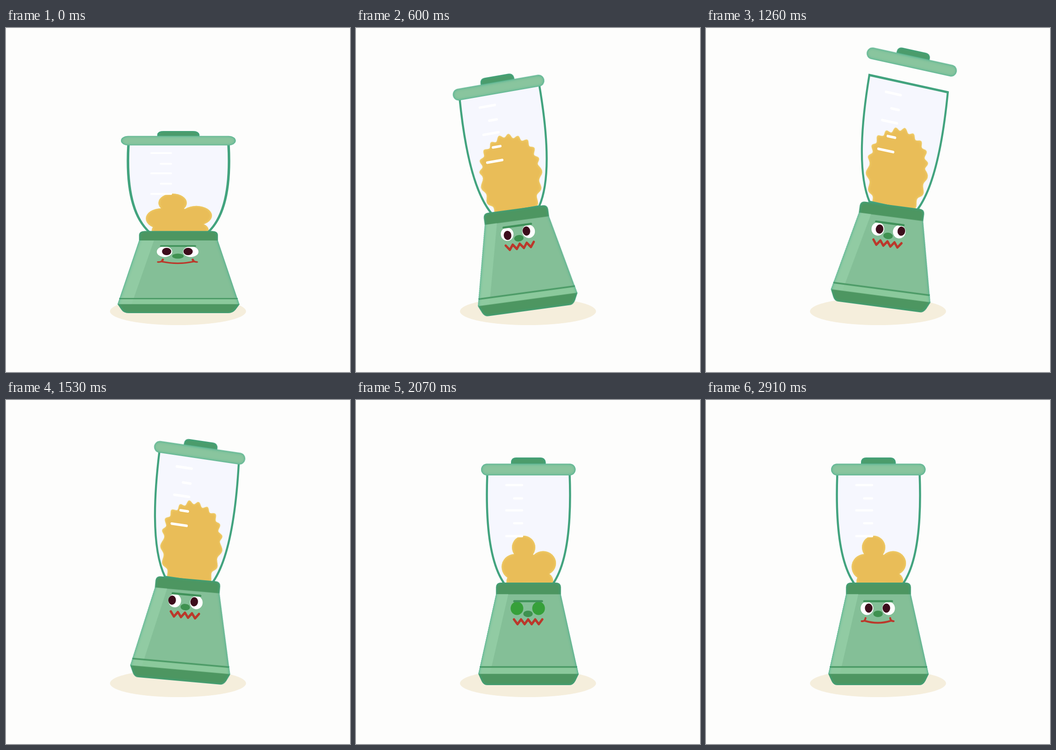
An HTML page for the animation above (2.94 s loop, 748x748 px).

```html
<!DOCTYPE html>
<html lang="en">
<head>
<meta charset="utf-8">
<title>Shaking blender</title>
<style>
  html, body { margin: 0; width: 100%; height: 100%; overflow: hidden; background: #fdfdfc; }
  svg { display: block; width: 100vw; height: 100vh; }
</style>
</head>
<body>
<svg viewBox="0 0 748 748">
  <defs>
    <filter id="teal" x="-20%" y="-40%" width="140%" height="180%" color-interpolation-filters="sRGB">
      <feFlood flood-color="#35a98c"/>
      <feComposite in2="SourceAlpha" operator="out"/>
      <feGaussianBlur stdDeviation="3"/>
      <feComposite in2="SourceAlpha" operator="in" result="rim"/>
      <feMerge><feMergeNode in="SourceGraphic"/><feMergeNode in="rim"/></feMerge>
    </filter>
    <filter id="gold" x="-20%" y="-20%" width="140%" height="140%" color-interpolation-filters="sRGB">
      <feFlood flood-color="#f5d873"/>
      <feComposite in2="SourceAlpha" operator="out"/>
      <feGaussianBlur stdDeviation="3"/>
      <feComposite in2="SourceAlpha" operator="in" result="rim"/>
      <feMerge><feMergeNode in="SourceGraphic"/><feMergeNode in="rim"/></feMerge>
    </filter>
    <path id="glass" d="M285.500 160C282 250 287 350 323 400H428C463 350 468 250 464.500 160Z"/>
    <clipPath id="inside"><use href="#glass"/></clipPath>
  </defs>

  <ellipse cx="374" cy="616" rx="148" ry="30" fill="#f5eedc"/>

  <g id="blender">
    <g id="jar">
      <use href="#glass" fill="#f6f7fe"/>
      <g clip-path="url(#inside)">
        <g id="lumps" fill="#e9bd58" filter="url(#gold)">
          <path d="M344 335L364 321L388 338L407 355L420 400H330Z"/>
          <circle cx="364.500" cy="320.500" r="25.500"/>
          <circle cx="344.500" cy="363" r="28"/>
          <ellipse cx="407" cy="355" rx="28" ry="26.500"/>
          <circle cx="346" cy="395" r="19"/>
          <circle cx="410" cy="394" r="19"/>
        </g>
        <path id="ball" fill="#e9bd58" filter="url(#gold)"/>
      </g>
      <path d="M327 185H361M344 214H361M327 240H361M344 268H361M327 296H361"
            stroke="#fff" stroke-width="5" stroke-linecap="round"/>
      <use href="#glass" fill="none" stroke="#42a37e" stroke-width="4.500"/>
    </g>

    <g id="lid">
      <path d="M337 141V135Q338 125 348 125H401Q411 125 412.500 135V141Z" fill="#4c9c6b" filter="url(#teal)"/>
      <rect x="272" y="138.500" width="205.500" height="25.500" rx="12.700" fill="#89c59e" filter="url(#teal)" id="rim"/>
    </g>

    <g filter="url(#teal)">
      <path d="M304.500 423V407Q305 397 315 397H435Q445 397 445.500 407V423Z" fill="#4d9661"/>
      <path d="M304.500 422.500H445.500L484 596H266Z" fill="#84bf97"/>
      <path d="M304.500 422.500H331L291 596H266Z" fill="#91cca3"/>
      <path d="M269.500 582H481L484 596H266Z" fill="#8bc99c"/>
      <path d="M304.500 422.500H331L291 596H266Z" fill="#91cca3" opacity=".6"/>
      <path d="M269 580.500H481" stroke="#4b9a66" stroke-width="3.500"/>
      <path d="M266 595.500H484.500L477 611Q472 620 464 620H286Q277 620 273 611Z" fill="#4d9661"/>
    </g>

    <g id="face" fill="none" stroke-linecap="round" stroke-linejoin="round">
      <g id="eyes">
        <ellipse cx="350" cy="453" rx="13.800" ry="14.500" fill="#fff"/>
        <ellipse cx="397" cy="453" rx="13.800" ry="14.500" fill="#fff"/>
        <ellipse id="leftPupil" cx="349" cy="452.500" rx="8.300" ry="10" fill="#3d0d1c"/>
        <ellipse id="rightPupil" cx="397" cy="452.500" rx="8.300" ry="10" fill="#3d0d1c"/>
      </g>
      <g id="lids" fill="#36a03a">
        <ellipse cx="350" cy="453" rx="13.800" ry="14.500"/>
        <ellipse cx="397" cy="453" rx="13.800" ry="14.500"/>
      </g>
      <path d="M344 437.500H404.500" stroke="#40925a" stroke-width="4.500"/>
      <ellipse cx="374" cy="465" rx="10.300" ry="7" fill="#3f9150"/>
      <path id="smile" d="M338.500 481Q346 482 347 474M345 480Q374 489 402 480M408 481Q401 481 400.500 474"
            stroke="#bb382b" stroke-width="4"/>
      <path id="zigzag" stroke="#bb382b" stroke-width="5"/>
    </g>
  </g>
</svg>

<script>
const LOOP = 2940, STEP = 30;
const el = id => document.getElementById(id);
const parts = Object.fromEntries(
  ["blender", "jar", "lid", "lumps", "ball", "face", "eyes", "lids", "leftPupil", "rightPupil", "smile", "zigzag"]
    .map(id => [id, el(id)]));

// Keyframes are [time, value] pairs.
const LEAN = [[0, 0], [60, 0], [190, -8], [380, 7.5], [560, -8.7], [820, 8.2], [1030, -8.2],
  [1220, 10], [1380, -7], [1520, 5.2], [1700, -8.3], [1880, 0]];
const STRETCH = [[40, 1], [200, 1.1], [330, 1.14], [600, 1.088], [780, 1.13], [960, 1.097],
  [1220, 1.13], [1380, 1.1], [1530, 1.125], [1700, 1.1], [1880, 1]];
const BOB = [[0, 0], [150, -5], [330, 8], [480, -5], [600, -4], [780, 8], [960, -4.5],
  [1150, 8], [1340, -6], [1440, 6], [1530, -6], [1700, 6], [1860, 0]];
const LEFT_LOOK = [[90, 0], [330, -56], [600, 72], [960, 169], [1530, 540], [1950, 720]];
const RIGHT_LOOK = [[90, 180], [330, 346], [600, 554], [960, 810], [1530, 1274], [1950, 1620]];
// Lid jumps: start, length, height.
const HOPS = [[400, 160, 28], [945, 180, 28], [1200, 180, 45]];

const smooth = p => (1 - Math.cos(Math.PI * p)) / 2;

function valueAt(keys, t, ease = smooth) {
  if (t <= keys[0][0]) return keys[0][1];
  const i = keys.findIndex(k => k[0] > t);
  if (i < 0) return keys[keys.length - 1][1];
  const [t0, a] = keys[i - 1], [t1, b] = keys[i];
  return a + (b - a) * ease((t - t0) / (t1 - t0));
}

const hopAt = t => HOPS.reduce((sum, [start, length, height]) => {
  const p = (t - start) / length;
  return sum + (p > 0 && p < 1 ? height * Math.sin(Math.PI * p) : 0);
}, 0);

const show = (node, on) => node.setAttribute("visibility", on ? "visible" : "hidden");
const move = (node, transform) => node.setAttribute("transform", transform);
const polyline = points => "M" + points.map(p => p.map(v => v.toFixed(1)).join(" ")).join("L");

function ballPath(phase) {
  const points = [];
  for (let deg = 135; deg <= 405; deg += 2) {
    const a = deg * Math.PI / 180;
    const bump = 3.6 * Math.sin(20 * a + phase) + 1.2 * Math.sin(7 * a - phase);
    const height = Math.sin(a) > 0 ? 110 : 70;
    points.push([375 + (66 + bump) * Math.cos(a), 320 + (height + bump) * Math.sin(a)]);
  }
  return polyline(points) + "V402H328Z";
}

function zigzagPath(flip) {
  return polyline(Array.from({ length: 9 }, (_, i) =>
    [343.5 + i * 7.7, (i % 2 === 1) !== flip ? 487.5 : 477]));
}

function look(pupil, degrees) {
  const a = degrees * Math.PI / 180;
  move(pupil, `translate(${4.8 * Math.cos(a)} ${3.2 * Math.sin(a)})`);
}

function draw(t) {
  const lean = valueAt(LEAN, t);
  const stretch = valueAt(STRETCH, t);
  const bob = valueAt(BOB, t);
  const squash = 1 - smooth(Math.min(t / 120, 1));
  const lift = lean > 0 ? 1.8 * lean : -0.7 * lean;
  const skew = lean * (lean > 0 ? 0.65 : 0.28);
  const shift = Math.min(Math.abs(lean) / 3, 1.5);
  const narrow = 1 - (stretch - 1) * 0.22;

  move(parts.blender, `translate(${374.7 + shift} ${620 - lift}) rotate(${lean}) ` +
    `scale(${1 + 0.215 * squash} ${1 - 0.2 * squash}) translate(-374.7 -620)`);
  move(parts.jar, `translate(375 397) skewY(${skew}) scale(${narrow} ${stretch}) translate(-375 -397)`);
  move(parts.lid, `translate(375 ${162 - (stretch - 1) * 235 - hopAt(t)}) rotate(${skew}) ` +
    `scale(${narrow} 1) translate(-375 -162)`);
  move(parts.face, `translate(0 ${bob})`);

  const mixing = t >= 150 && t < 1890;
  show(parts.ball, mixing);
  show(parts.lumps, !mixing);
  if (mixing) parts.ball.setAttribute("d", ballPath(t * 0.02));

  const blink = t >= 2010 && t < 2160;
  show(parts.eyes, !blink);
  show(parts.lids, blink);
  look(parts.leftPupil, valueAt(LEFT_LOOK, t, p => p));
  look(parts.rightPupil, valueAt(RIGHT_LOOK, t, p => p));

  const gritted = t >= 90 && t < 2160;
  show(parts.smile, !gritted);
  show(parts.zigzag, gritted);
  parts.zigzag.setAttribute("d", zigzagPath(bob > 0));
}

let start;
function tick(now) {
  start ??= now;
  draw(Math.floor(((now - start) % LOOP) / STEP) * STEP);
  requestAnimationFrame(tick);
}
draw(0);
requestAnimationFrame(tick);
</script>
</body>
</html>
```
